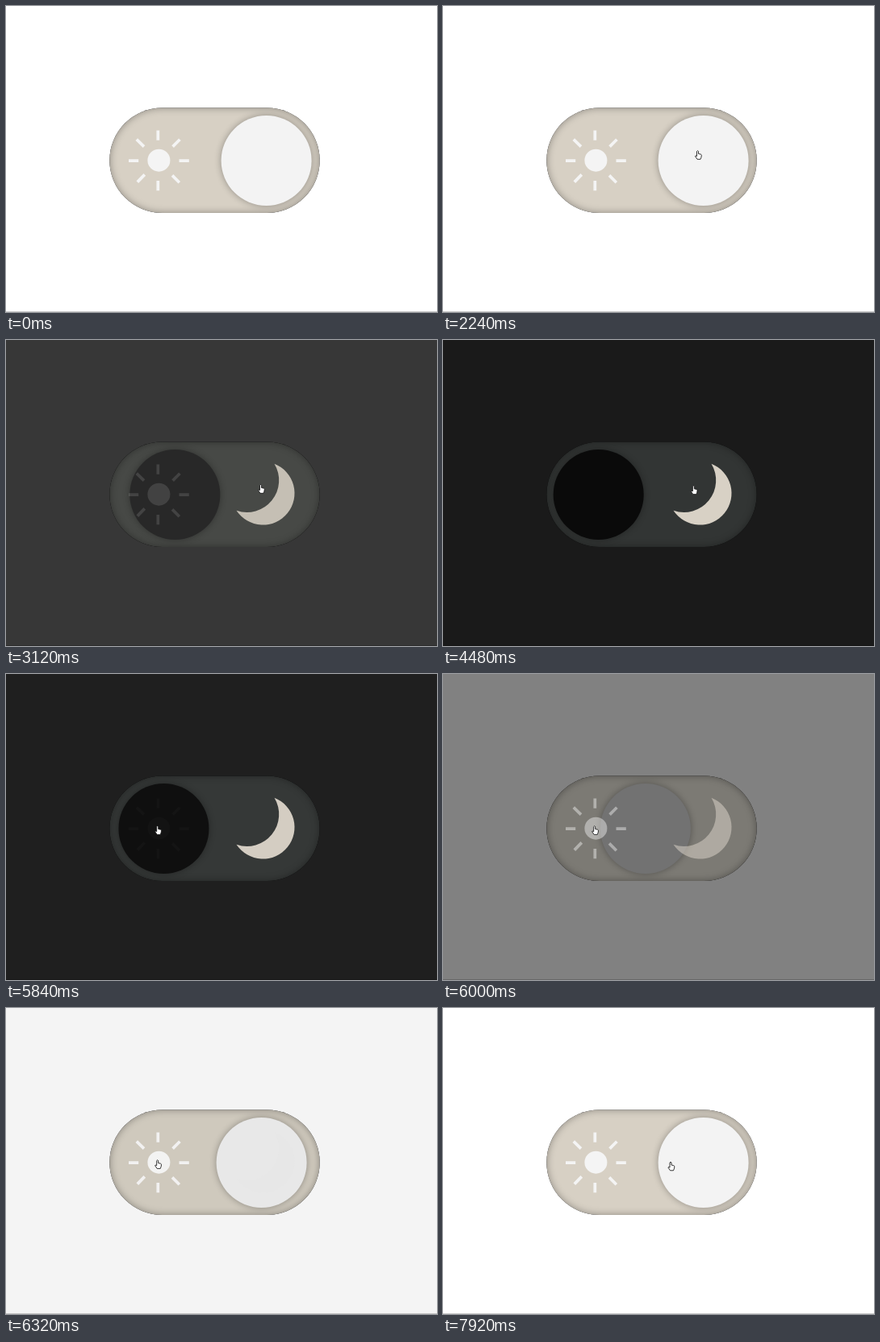
An HTML page with a canvas for the animation above (8 s loop, 534 by 380 pixels).

```html
<!DOCTYPE html>
<html lang="en">
<head>
<meta charset="utf-8">
<title>Day and night toggle</title>
<style>
html, body { margin: 0; width: 100%; height: 100%; overflow: hidden; background: #fff; }
canvas { display: block; width: 534px; height: 380px; }
</style>
</head>
<body>
<canvas id="stage" width="534" height="380"></canvas>
<script>
const W = 534, H = 380, LOOP = 8000, FADE = 690;
const NIGHT_AT = 2719, DAY_AT = 5815;
const ctx = document.getElementById('stage').getContext('2d');

const clamp = v => Math.min(1, Math.max(0, v));
const span = (t, from, to) => clamp((t - from) / (to - from));
const mix = (a, b, k) => a + (b - a) * k;
const blend = (a, b, k) => `rgb(${a.map((v, i) => Math.round(mix(v, b[i], k))).join()})`;
const smooth = u => u * u * (3 - 2 * u);

// cubic-bezier(.25, .1, .25, 1)
function ease(x) {
  const curve = (s, a, b) => 3 * a * s * (1 - s) ** 2 + 3 * b * s * s * (1 - s) + s ** 3;
  let lo = 0, hi = 1;
  for (let i = 0; i < 24; i++) {
    const mid = (lo + hi) / 2;
    if (curve(mid, 0.25, 0.25) < x) lo = mid; else hi = mid;
  }
  return x <= 0 ? 0 : x >= 1 ? 1 : curve(lo, 0.1, 1);
}

const track = new Path2D();
track.roundRect(128.3, 126.5, 260.4, 130.4, 65.2);
const around = new Path2D();
around.rect(0, 0, W, H);
around.addPath(track);

const sun = new Path2D();
sun.arc(189.4, 191.7, 14, 0, Math.PI * 2);
const rays = new Path2D(
  'M188.3 154.5V166.8M188.3 217V229.2M152 192.1H164.2M214.5 192.1H226.8' +
  'M161.8 165.6L171 174.6M206.6 174.6L215.4 165.8M162.8 218.6L171.8 209.4M206 210.4L214.8 219.2');
const moon = new Path2D(
  'M332.5 153.8A39.2 39.2 0 1 1 285.5 211.8A39.7 39.7 0 0 0 332.5 153.8Z');
const hand = new Path2D(
  'M-1 1Q0 -.7 1 1V4L3.8 4.6Q4.9 5 4.8 6.2L4.3 8.8L3.5 10.8H-.5L-3 7.2Q-3.1 5.7 -1 7Z');
const arrow = new Path2D('M0 0V8L2 6.3L3.2 9L4.2 8.5L3.1 6H5.5Z');

function shadow(alpha, blur) {
  ctx.shadowColor = `rgba(0,0,0,${alpha})`;
  ctx.shadowBlur = blur;
}

function drawTrack(night) {
  ctx.fillStyle = blend([215, 208, 196], [50, 53, 52], night);
  ctx.fill(track);
  ctx.save();
  ctx.clip(track);
  shadow(0.35, 10);
  ctx.fillStyle = '#000';
  ctx.fill(around, 'evenodd');
  ctx.restore();
}

function drawKnob(night) {
  ctx.save();
  shadow(0.32, 9);
  ctx.fillStyle = blend([243, 243, 243], [10, 10, 10], night);
  ctx.beginPath();
  ctx.arc(mix(322.6, 192.7, night), 192, 56, 0, Math.PI * 2);
  ctx.fill();
  ctx.restore();
}

function drawIcons(night) {
  ctx.globalAlpha = 1 - night;
  ctx.fillStyle = ctx.strokeStyle = '#f4f4f4';
  ctx.lineWidth = 3.7;
  ctx.fill(sun);
  ctx.stroke(rays);
  ctx.globalAlpha = night;
  ctx.fillStyle = '#d8d1c5';
  ctx.fill(moon);
  ctx.globalAlpha = 1;
}

function pointerAt(t) {
  if (t < 4400) {
    const left = 1 - span(t, 80, 2240);
    return [mix(315.5, 239, left ** 1.5), mix(179.5, 0, left ** 1.65)];
  }
  if (t < 7280) {
    const k = smooth(span(t, 4360, 5350));
    return [mix(315.5, 187.7, k), mix(180.5, 188.6, k)];
  }
  const k = span(t, 7280, 7920) ** 1.3;
  return [mix(187.7, 282, k), mix(188.6, 191, k)];
}

function drawPointer(t) {
  if (t < 80) return;
  const [x, y] = pointerAt(t);
  const shape = y > 126 ? hand : arrow;
  ctx.save();
  ctx.translate(x, y);
  ctx.fillStyle = '#fff';
  ctx.strokeStyle = '#111';
  ctx.lineWidth = 0.85;
  ctx.lineJoin = 'round';
  ctx.fill(shape);
  ctx.stroke(shape);
  ctx.restore();
}

function draw(t) {
  const night = ease((t - NIGHT_AT) / FADE) - ease((t - DAY_AT) / FADE);
  ctx.fillStyle = blend([255, 255, 255], [26, 26, 26], night);
  ctx.fillRect(0, 0, W, H);
  ctx.fillStyle = 'rgba(0,0,0,.2)';
  ctx.fillRect(0, H - 1, W, 1);
  drawTrack(night);
  drawKnob(night);
  drawIcons(night);
  drawPointer(t);
}

let start;
function tick(now) {
  start ??= now;
  draw((now - start) % LOOP);
  requestAnimationFrame(tick);
}
draw(0);
requestAnimationFrame(tick);
</script>
</body>
</html>
```
